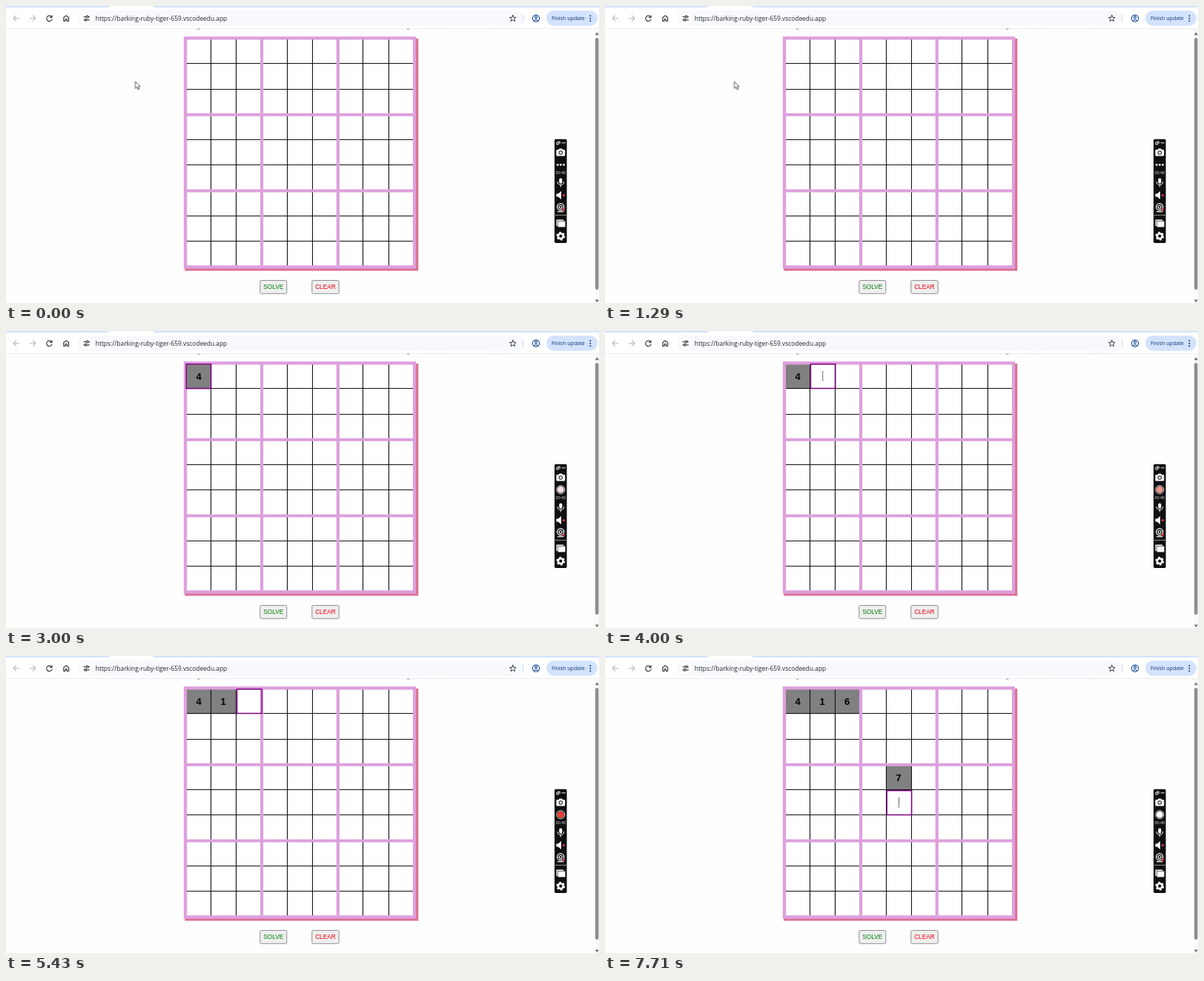
An HTML page for the animation above (8 s loop, 800x401 px).

```html
<!DOCTYPE html>
<html lang="en">
<head>
<meta charset="utf-8">
<title>Sudoku solver</title>
<style>
html, body { margin: 0; width: 100%; height: 100%; overflow: hidden; background: #fff; }
svg { display: block; width: 100vw; height: 100vh; }
.ui { font-family: "Open Sans", "Noto Sans", sans-serif; }
.arial { font-family: "Liberation Sans", Arial, sans-serif; }
.line { fill: none; stroke-linecap: round; stroke-linejoin: round; }

.arrow, .beam, .ring, .caret, .dots, .rec, .digit { animation: 8s step-end infinite; }
.arrow { animation-name: arrow; }
.beam { animation-name: beam; }
.ring { animation-name: ring; }
.caret { animation-name: caret; }
.dots { animation-name: dots; }
.rec { animation-name: rec; }
.pulse { animation: pulse 8s linear infinite; }
.arrow, .beam { animation-timing-function: linear; }

/* pointer glides from the margin into the first cell */
@keyframes arrow {
  0%, 17% { transform: translate(174.5px, 102px); opacity: 1; }
  19.9% { transform: translate(228px, 76px); opacity: 1; }
  19.91%, 100% { transform: translate(228px, 76px); opacity: 0; }
}
@keyframes beam {
  0%, 19.9% { transform: translate(240px, 70px); opacity: 0; }
  19.91% { transform: translate(240px, 70px); opacity: 1; }
  21.5%, 37.3% { transform: translate(256px, 62.5px); opacity: 1; }
  37.31%, 76.5% { transform: translate(322px, 112px); opacity: 0; }
  76.51% { transform: translate(322px, 112px); opacity: 1; }
  80%, 89.1% { transform: translate(395.3px, 173.3px); opacity: 1; }
  89.11%, 100% { transform: translate(395.3px, 173.3px); opacity: 0; }
}
/* focused cell */
@keyframes ring {
  0% { opacity: 0; transform: none; }
  28.5% { opacity: 1; transform: none; }
  44.5% { opacity: 1; transform: translate(34.25px, 0); }
  60.6% { opacity: 1; transform: translate(68.5px, 0); }
  83.8% { opacity: 1; transform: translate(137px, 102.75px); }
  92.7%, 100% { opacity: 1; transform: translate(137px, 137px); }
}
@keyframes caret {
  0% { opacity: 0; }
  28.5% { opacity: 1; }
  34.8% { opacity: 0; }
  44.5% { opacity: 1; }
  50.9% { opacity: 0; }
  60.6% { opacity: 1; }
  66.9% { opacity: 0; }
  83.8% { opacity: 1; }
  89.1% { opacity: 0; }
  92.7%, 100% { opacity: 1; }
}
@keyframes d0 { 0% { opacity: 0; } 37.3%, 100% { opacity: 1; } }
@keyframes d1 { 0% { opacity: 0; } 53.5%, 100% { opacity: 1; } }
@keyframes d2 { 0% { opacity: 0; } 73.1%, 100% { opacity: 1; } }
@keyframes d3 { 0% { opacity: 0; } 89.1%, 100% { opacity: 1; } }
/* recorder button */
@keyframes dots { 0% { opacity: 1; } 17.8%, 100% { opacity: 0; } }
@keyframes rec { 0% { opacity: 0; } 17.8%, 100% { opacity: 1; } }
@keyframes pulse {
  0%, 22% { fill: #e8564f; }
  24%, 31.2% { fill: #ee4038; }
  35.6%, 37.4% { fill: #fff; }
  38.1%, 46.1% { fill: #ee4038; }
  50% { fill: #f1908a; }
  50.8%, 52.2% { fill: #fff; }
  53%, 61% { fill: #ee4038; }
  65.4%, 67.1% { fill: #fff; }
  67.8%, 75.8% { fill: #ee4038; }
  80.2%, 82% { fill: #fff; }
  82.7%, 90.7% { fill: #ee4038; }
  95.1%, 96.9% { fill: #fff; }
  97.6%, 100% { fill: #ee4038; }
}
</style>
</head>
<body>
<svg viewBox="0 0 800 401" preserveAspectRatio="none">
  <rect width="800" height="401" fill="#fffeff"/>

  <!-- page heading cut off by the toolbar -->
  <g fill="#777">
    <rect x="258" y="30.3" width="3.4" height="1.2"/>
    <rect x="541" y="30.3" width="3.4" height="1.2"/>
    <path d="M570 30.5h3M577 30.5h2M584 30.5h4M653 30.5h5M661 30.5h3M667 30.5h2M678 30.5h2" stroke="#ccc" stroke-width=".8"/>
  </g>

  <!-- browser toolbar -->
  <rect width="800" height="30" fill="#fff"/>
  <path d="M0 0H141Q139 2 136 2H0ZM198 0H800V2H203Q199 2 198 0Z" fill="#d3e3fd"/>
  <rect y="30" width="800" height=".7" fill="#e3e6ea"/>
  <rect x="97" y="6" width="600" height="21" rx="10.5" fill="#f7f9fd"/>
  <circle cx="108.5" cy="16.7" r="8" fill="#fff"/>
  <g class="line" stroke="#b4b6b9" stroke-width="1.1">
    <path d="M17.6 16.7H10.2M13.6 13.2L10.1 16.7L13.6 20.2"/>
    <path d="M32.4 16.7H39.8M36.4 13.2L39.9 16.7L36.4 20.2"/>
  </g>
  <g class="line" stroke="#3c4043" stroke-width="1.2">
    <path d="M61.6 15A3.7 3.7 0 1 0 62 17.8M62 12.8V15.4H59.4"/>
    <path d="M77.8 20.3V15.6L81.2 13L84.6 15.6V20.3H82.3V17.6H80.1V20.3Z"/>
    <path d="M105 14.6H107.6M111.2 14.6H112.4M105 18.8H106M109.6 18.8H112.4"/>
    <circle cx="109.7" cy="14.6" r="1.4"/>
    <circle cx="107.6" cy="18.8" r="1.4"/>
    <path id="star" stroke-width="1"/>
  </g>
  <text class="ui" x="120.8" y="19.9" font-size="8.4" fill="#25282b">https://barking-ruby-tiger-659.vscodeedu.app</text>
  <rect x="697.3" y="11.5" width="1" height="10.5" fill="#c5d8fa"/>
  <g class="line" stroke="#174a94" stroke-width="1.1">
    <circle cx="715" cy="16.7" r="4.6"/>
    <circle cx="715" cy="15.4" r="1.5"/>
    <path d="M711.9 19.9Q715 17.5 718.1 19.9"/>
  </g>
  <rect x="729" y="6.3" width="69" height="20.4" rx="10.2" fill="#d3e3fd"/>
  <text class="ui" x="736" y="19.3" font-size="7.1" font-weight="500" fill="#0c3471">Finish update</text>
  <g fill="#0c3471">
    <circle cx="788.3" cy="13.2" r="1"/><circle cx="788.3" cy="16.7" r="1"/><circle cx="788.3" cy="20.2" r="1"/>
  </g>

  <!-- board -->
  <path d="M243 44H556.3V357.4H241.2V352Z" fill="#db7093"/>
  <rect x="239.8" y="41.5" width="313.4" height="313" fill="#dda0dd"/>
  <rect x="244.2" y="45.2" width="304.8" height="305.3" fill="#fff"/>
  <g id="digits" class="arial" font-size="13" font-weight="700" text-anchor="middle"></g>
  <g id="grid"></g>
  <rect x="242" y="43.4" width="309" height="309" fill="none" stroke="#dda0dd" stroke-width="4"/>
  <g class="ring">
    <rect x="243.2" y="44.7" width="33.4" height="32.8" fill="none" stroke="#800080" stroke-width="1.5"/>
    <rect class="caret" x="259" y="54" width=".9" height="13.6" fill="#555"/>
  </g>

  <!-- buttons -->
  <g fill="#efefef" stroke="#85858a" stroke-width=".9">
    <rect x="342.8" y="370.5" width="36" height="17.8" rx="1.6"/>
    <rect x="412.8" y="370.5" width="36.4" height="17.8" rx="1.6"/>
  </g>
  <g class="arial" font-size="8.25" text-anchor="middle">
    <text x="360.7" y="382.4" fill="#008000">SOLVE</text>
    <text x="430.9" y="382.4" fill="#f00010">CLEAR</text>
  </g>

  <!-- scrollbar -->
  <rect x="794" y="31" width="6" height="370" fill="#fafafa"/>
  <rect x="795" y="43" width="4.4" height="340" rx="2.2" fill="#8d8d8d"/>
  <path d="M794.8 39.2L797.3 35.2L799.8 39.2ZM794.8 396.4L797.3 400.2L799.8 396.4Z" fill="#707070"/>

  <!-- recorder panel -->
  <rect x="740" y="179.7" width="16.6" height="140.3" rx="1.8" fill="#101012"/>
  <g class="line" stroke="#fff" stroke-width=".9">
    <path d="M743.3 184.2H745.6V187H743.3ZM744.8 183H747.2V185.6M750 184.8H754.4"/>
  </g>
  <g fill="#fff">
    <path d="M743.6 194H745.5L746.6 192.5H750L751.1 194H753Q754.2 194 754.2 195.2V201.2Q754.2 202.4 753 202.4H743.6Q742.4 202.4 742.4 201.2V195.2Q742.4 194 743.6 194Z"/>
    <circle cx="748.3" cy="198" r="2.7" fill="#101012"/>
    <circle cx="748.3" cy="198" r="1.8"/>
    <g class="dots">
      <circle cx="744.2" cy="214.4" r="1.4"/><circle cx="748.3" cy="214.4" r="1.4"/><circle cx="752.4" cy="214.4" r="1.4"/>
    </g>
    <g class="rec">
      <circle cx="748.3" cy="214.2" r="5.5" fill="none" stroke="#fff" stroke-width=".9"/>
      <circle class="pulse" cx="748.3" cy="214.2" r="4.4"/>
    </g>
    <text class="arial" x="748.3" y="226.8" font-size="5.5" text-anchor="middle" fill="#d5d5d5">00:40</text>
    <rect x="746.3" y="232.4" width="4" height="7.4" rx="2"/>
    <path class="line" d="M744 237.6Q744.2 241.4 748.3 241.4T752.6 237.6M748.3 241.4V244" stroke="#fff" stroke-width="1"/>
    <path d="M742.4 253.4H744.8L749 250V261L744.8 257.6H742.4Z"/>
    <circle cx="752.4" cy="255.6" r="1.6" fill="#e0364a"/>
    <circle cx="748.2" cy="271.2" r="4.5" fill="none" stroke="#fff" stroke-width="1.3"/>
    <circle cx="748.2" cy="271.2" r="2" fill="none" stroke="#fff" stroke-width="1.1"/>
    <path d="M744 277.6H752.4" stroke="#fff" stroke-width="1.3"/>
    <circle cx="752.3" cy="275" r="1.7" fill="#e0364a"/>
    <path d="M741 282.4H756" stroke="#e4e4c8" stroke-width=".9" stroke-dasharray="1.5 .7"/>
    <path d="M742.6 288.6H752.2V290H744V297H742.6Z"/>
    <rect x="744.6" y="290.6" width="9.8" height="7.8"/>
    <circle cx="748.3" cy="310.7" r="3.4" fill="none" stroke="#fff" stroke-width="2.6"/>
    <circle cx="748.3" cy="310.7" r="5" fill="none" stroke="#fff" stroke-width="1.8" stroke-dasharray="2.6 2.636"/>
  </g>

  <!-- pointers -->
  <path class="arrow" d="M0 0V9.4L2.2 7.4L3.8 10.9L5.4 10.2L3.9 6.8H6.8Z" fill="#fff" stroke="#333" stroke-width=".8" stroke-linejoin="round"/>
  <path class="beam line" d="M-2.6 -5H-.8L0 -4.4L.8 -5H2.6M0 -4.4V4.4M-2.6 5H-.8L0 4.4L.8 5H2.6" stroke="#222" stroke-width="1.1"/>
</svg>
<script>
const NS = "http://www.w3.org/2000/svg";
const STEP = 34.25, LEFT = 242, TOP = 44;

function add(parent, tag, attrs) {
  const el = document.createElementNS(NS, tag);
  for (const key in attrs) el.setAttribute(key, attrs[key]);
  return parent.appendChild(el);
}

// thin lines first, so the box dividers lie on top
const grid = document.getElementById("grid");
for (const thick of [false, true]) {
  for (let i = 1; i < 9; i++) {
    if ((i % 3 === 0) !== thick) continue;
    const x = LEFT + STEP * i, y = TOP + STEP * i;
    const vx = thick ? x + 0.3 : Math.floor(x) + 0.5;
    const hy = thick ? y : Math.floor(y - 0.3) + 0.5;
    const pen = { stroke: thick ? "#dda0dd" : "#111", "stroke-width": thick ? 4.2 : 1.1 };
    add(grid, "path", { d: `M${vx} 45V350.5M244 ${hy}H549.3`, ...pen });
  }
}

// value, column, row, text centre, baseline
const typed = [[4, 0, 0, 260, 66.4], [1, 1, 0, 293, 66.4], [6, 2, 0, 326.6, 66.2], [7, 4, 3, 396, 168.8]];
typed.forEach(([value, col, row, x, y], i) => {
  const g = add(document.getElementById("digits"), "g", { class: "digit", style: `animation-name:d${i}` });
  add(g, "rect", { x: LEFT + STEP * col, y: TOP + STEP * row, width: STEP, height: STEP, fill: "#808080" });
  add(g, "text", { x, y }).textContent = value;
});

const tips = Array.from({ length: 10 }, (_, i) => {
  const r = i % 2 ? 2 : 4.6, a = (i / 5 - 0.5) * Math.PI;
  return `${(683.8 + r * Math.cos(a)).toFixed(2)} ${(16.9 + r * Math.sin(a)).toFixed(2)}`;
});
document.getElementById("star").setAttribute("d", `M${tips.join("L")}Z`);
</script>
</body>
</html>
```
